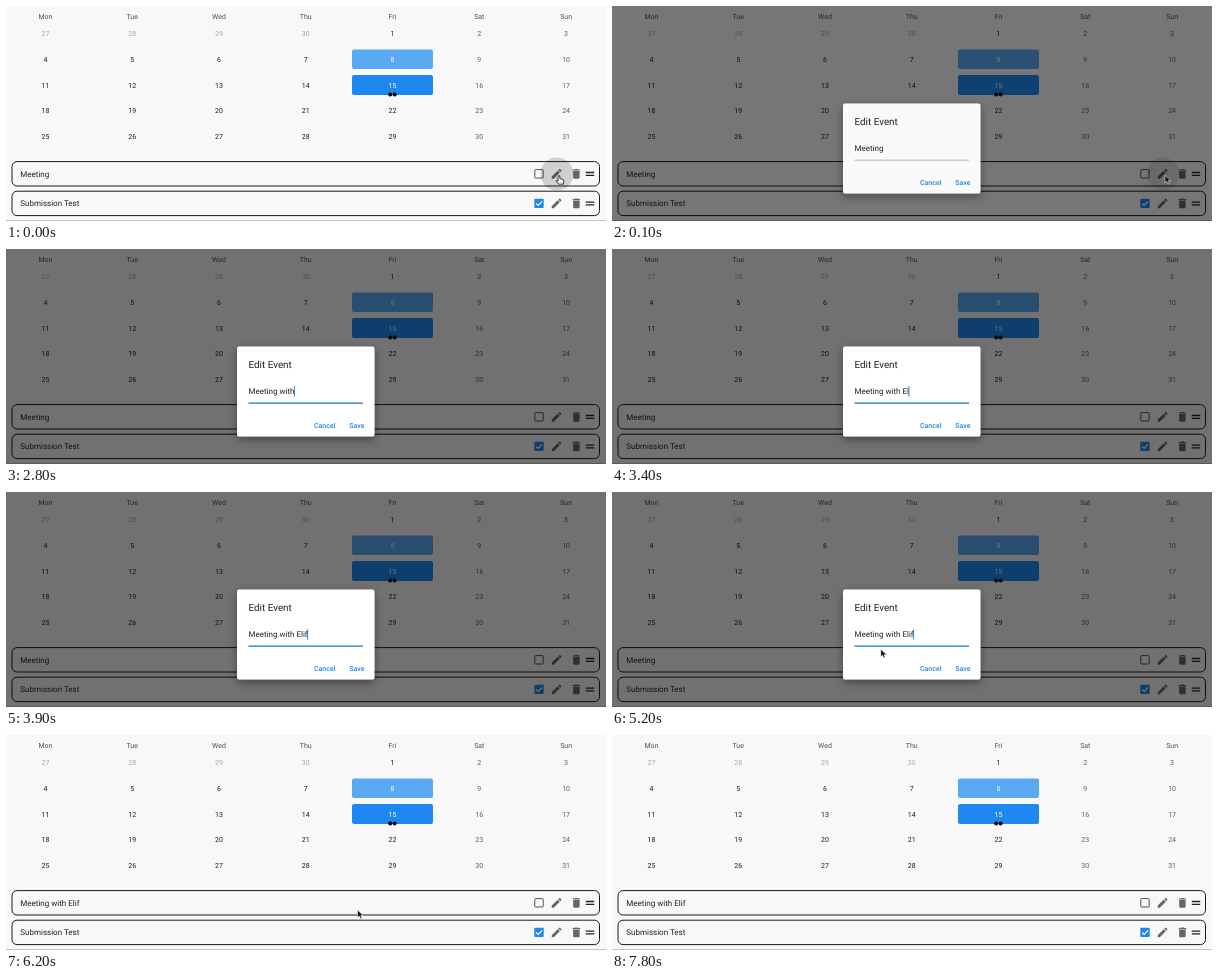
Write an HTML page that moves like this. It is 600x215 px and loops after 8.8 s.

```html
<!DOCTYPE html>
<html lang="en">
<head>
<meta charset="utf-8">
<title>Edit event</title>
<style>
  html, body { margin: 0; width: 100%; height: 100%; overflow: hidden; background: #f8f8f8; }
  svg { display: block; width: 600px; height: 215px; font-family: Roboto, sans-serif; text-rendering: geometricPrecision; }
  .mid { text-anchor: middle; font-size: 7px; }
  .body { font-size: 8px; fill: #212121; white-space: pre; }
  .button { font-size: 7px; font-weight: 500; fill: #1e88e5; }
</style>
</head>
<body>
<svg viewBox="0 0 600 215">
  <defs>
    <g id="pencil" transform="scale(.54)"><path d="M-9 5.2V9h3.8L5.8-2 2-5.8zM8.7-5a1 1 0 0 0 0-1.4L6.4-8.7a1 1 0 0 0-1.4 0L3.1-6.8 6.9-3z"/></g>
    <g id="bin" transform="scale(.54)"><path d="M-6 7a2 2 0 0 0 2 2h8a2 2 0 0 0 2-2V-5H-6zM7-8H3.5l-1-1h-5l-1 1H-7v2H7z"/></g>
    <path id="arrow" d="M0 0V7.6L1.8 6 3 8.7l1.4-.6-1.2-2.6h2.5z" fill="#111" stroke="#fff" stroke-width=".5"/>
    <path id="hand" d="M-.9.7Q0-.5.9.7V3.4l3.1.8q1 .3.9 1.3L4.3 8.8H-.2L-2.9 5.6q.3-1.2 2 .1z" fill="#fff" stroke="#111" stroke-width=".8" stroke-linejoin="round"/>
    <path id="beam" d="M-1.6-4.3Q0-4.3 0-3.4 0-4.3 1.6-4.3M0-3.4V3.4M-1.6 4.3Q0 4.3 0 3.4 0 4.3 1.6 4.3" fill="none" stroke="#222" stroke-width=".8"/>
    <filter id="shadow" x="-20%" y="-20%" width="140%" height="150%">
      <feDropShadow dx="0" dy="3" stdDeviation="4" flood-opacity=".4"/>
    </filter>
  </defs>
  <rect width="600" height="215" fill="#f8f8f8"/>
  <g id="calendar"></g>
  <g id="events"></g>
  <rect y="214" width="600" height="1" fill="#c4c4c4"/>
  <circle id="ripple" cx="551" cy="168" r="16.5"/>
  <rect id="dim" width="600" height="215"/>
  <g id="dialog">
    <rect x="231" y="97.5" width="137.5" height="90" rx="2" fill="#fff" filter="url(#shadow)"/>
    <text x="242.5" y="118.7" font-size="9.9" fill="#212121">Edit Event</text>
    <text id="field" class="body" x="242.5" y="145.2"></text>
    <rect x="242.5" y="153.8" width="114.5" height=".6" fill="#8c8c8c"/>
    <rect id="line" y="153.5"/>
    <rect id="caret" y="137.2" width="1" height="10.4" fill="#1e88e5"/>
    <rect id="hover" x="337" y="169.5" width="27.5" height="15" rx="2" fill="#e4f2fd"/>
    <circle id="press" cx="351" cy="177" fill="#1e88e5" opacity=".1"/>
    <text class="button" x="308" y="179.4">Cancel</text>
    <text class="button" x="343.3" y="179.4">Save</text>
  </g>
  <use id="cursor"/>
</svg>
<script>
const $ = id => document.getElementById(id);
const set = (id, attrs) => { for (const k in attrs) $(id).setAttribute(k, attrs[k]); };
const show = (id, on) => set(id, { visibility: on ? 'visible' : 'hidden' });

const LOOP = 8800, OPEN = 100, FOCUS = 1400, BLUR = 6000, CLOSE = 6200;
const OLD = 'Meeting', NEW = 'Meeting with Elif';

const colX = i => 39.4 + i * 86.78;
const label = (x, y, s, fill) => `<text class="mid" x="${x}" y="${y}" fill="${fill}">${s}</text>`;

function buildCalendar() {
  let out = '<rect x="346" y="43.5" width="81" height="19.5" rx="2" fill="#58a8f2"/>' +
    '<rect x="346" y="69" width="81" height="20" rx="2" fill="#1e88f0"/>' +
    '<circle cx="384.2" cy="88.4" r="2"/><circle cx="388.6" cy="88.4" r="2"/>';
  ['Mon', 'Tue', 'Wed', 'Thu', 'Fri', 'Sat', 'Sun'].forEach((d, i) => out += label(colX(i), 13.4, d, '#4f4f4f'));
  for (let i = 0; i < 35; i++) {
    const day = i < 4 ? 27 + i : i - 3;
    const fill = i < 4 ? '#a8a8a8' : day === 8 || day === 15 ? '#fafafa' : i % 7 > 4 ? '#5e5e5e' : '#1c1c1c';
    out += label(colX(i % 7), 30.2 + Math.floor(i / 7) * 25.65, day, fill);
  }
  $('calendar').innerHTML = out;
}

function eventRow(y, id, text, done) {
  const box = done
    ? `<rect x="528.3" y="${y - 4.7}" width="9.4" height="9.4" rx="1" fill="#1e88f0"/>
       <path d="M530.2 ${y + .1}l2 2 3.8-4" fill="none" stroke="#fff" stroke-width="1.1"/>`
    : `<rect x="528.8" y="${y - 4.2}" width="8.4" height="8.4" rx=".6" fill="none" stroke="#555"/>`;
  return `<rect x="6" y="${y - 12.2}" width="587.5" height="24.4" rx="5" fill="none" stroke="#1a1a1a"/>
    <text id="${id}" class="body" x="14.3" y="${y + 2.8}">${text}</text>${box}
    <g fill="#666"><use href="#pencil" x="550.6" y="${y}"/><use href="#bin" x="570.4" y="${y}"/></g>
    <path d="M579.8 ${y - 1.3}h8.4m-8.4 2.8h8.4" stroke="#222" stroke-width="1.3"/>`;
}

// Typing: [time, number of characters]
const keys = [[1500, 7], [2000, 8], [2400, 9], [2600, 10], [2700, 11], [2800, 12],
  [3000, 13], [3200, 14], [3400, 15], [3800, 16], [3900, 17]];

// Pointer: [time, x, y, glide to the next point]
const path = [[0, 553, 169.3], [400, 351.5, 168.5], [600, 351.5, 168.5, 1], [1200, 309, 146.6],
  [4800, 309, 146.6, 1], [5200, 268.8, 157.2], [5300, 268.8, 157.2, 1], [5800, 351.5, 175]];

const last = (table, t) => table.findLastIndex(row => row[0] <= t);

function pointer(t) {
  const i = last(path, t), a = path[i], b = path[i + 1];
  if (!a[3]) return [a[1], a[2]];
  const u = (t - a[0]) / (b[0] - a[0]), e = u * u * (3 - 2 * u);
  return [a[1] + (b[1] - a[1]) * e, a[2] + (b[2] - a[2]) * e];
}

function drawPointer(t, open) {
  const [x, y] = pointer(t);
  const onSave = open && x > 337 && y > 170;
  const inField = open && x < 357 && y > 134 && y < 156;
  const kind = t < OPEN || onSave ? 'hand' : inField ? 'beam' : 'arrow';
  set('cursor', { href: '#' + kind, x, y });
  show('cursor', t < 1900 || t >= 4900 && t < 7800);
  set('hover', { opacity: onSave ? 1 : 0 });
  set('press', { r: t >= 5900 && open ? 4 + (t - 5900) / 25 : 0 });
}

function drawField(t) {
  const k = last(keys, t), field = $('field');
  field.textContent = k < 0 ? OLD : NEW.slice(0, keys[k][1]);
  const lit = k >= 0 && t < 5900 && Math.floor((t - keys[k][0]) / 500) % 2 === 0;
  set('caret', { x: 242 + field.getComputedTextLength(), opacity: lit ? 1 : 0 });

  const w = t < FOCUS ? 0 : t < FOCUS + 100 ? 70 : 114.5;
  set('line', { x: 299.75 - w / 2, width: w, height: t > BLUR ? .9 : 1.2, fill: t > BLUR ? '#3f7fb8' : '#1e88e5' });
}

function draw(t) {
  const open = t >= OPEN && t < CLOSE;
  $('meeting').textContent = t < CLOSE ? OLD : NEW;
  set('ripple', { opacity: t < OPEN ? .16 : t < 200 ? .1 : 0 });
  set('dim', { opacity: !open ? 0 : t < 200 ? .52 : .54 });
  set('dialog', { opacity: !open ? 0 : t < 200 ? .97 : 1 });
  drawField(t);
  drawPointer(t, open);
}

buildCalendar();
$('events').innerHTML = eventRow(167.8, 'meeting', OLD, false) + eventRow(197.4, 'test', 'Submission Test', true);

const start = performance.now();
let shown = -1;
function tick() {
  const t = Math.floor((performance.now() - start) % LOOP / 100) * 100;
  if (t !== shown) draw(shown = t);
  requestAnimationFrame(tick);
}
tick();
</script>
</body>
</html>
```
